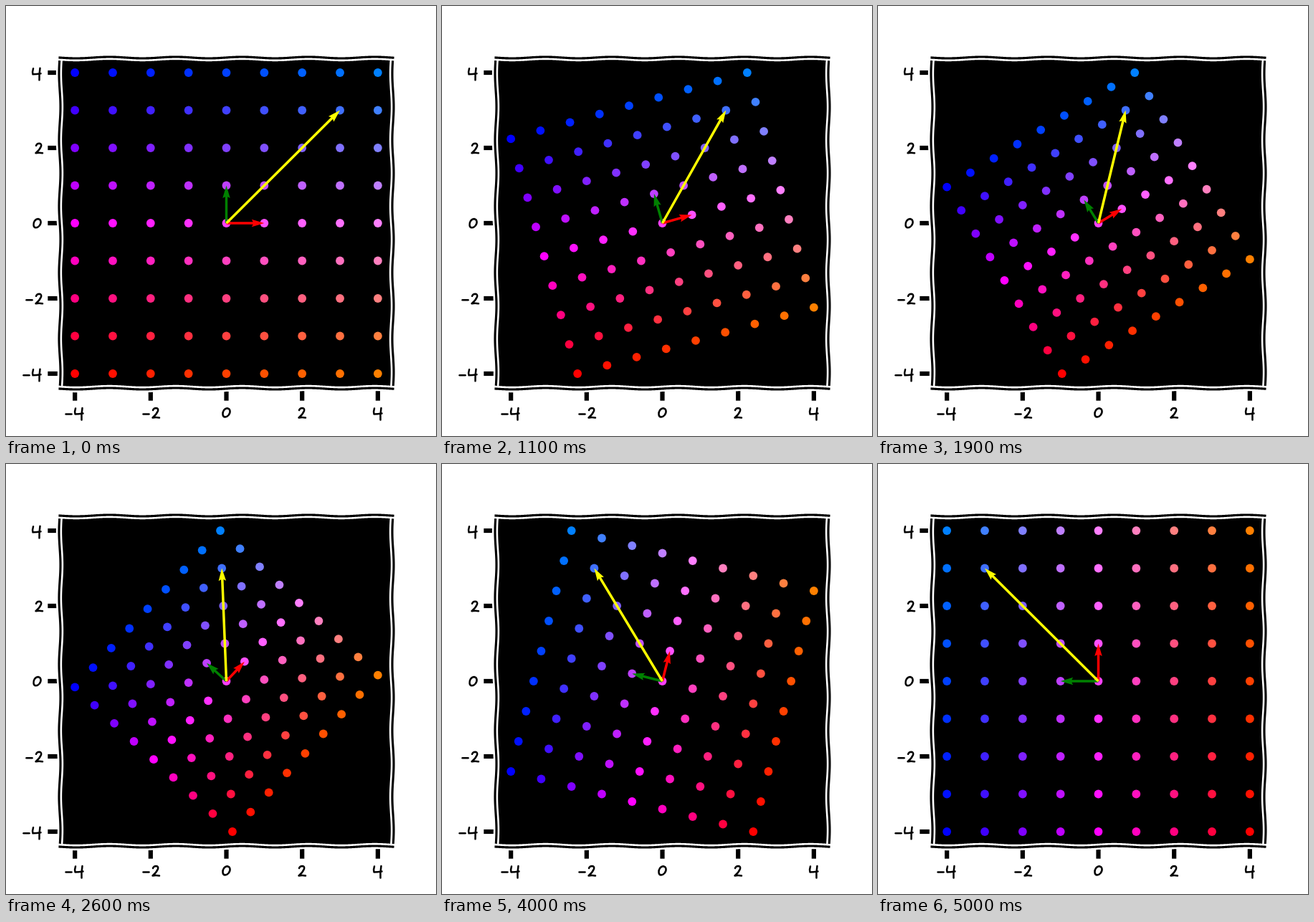
Recreate the animation shown at these times as an HTML page with a canvas. Size 600 by 600 pixels, loop 5100 ms.

```html
<!DOCTYPE html>
<html lang="en">
<head>
<meta charset="utf-8">
<title>Linear map of a grid</title>
<style>
html, body { margin: 0; width: 100%; height: 100%; overflow: hidden; background: #fff; }
canvas { display: block; width: 600px; height: 600px; }
</style>
</head>
<body>
<canvas id="stage" width="600" height="600" role="img"
  aria-label="Grid of points, both axes labelled -4, -2, 0, 2, 4"></canvas>
<script>
const ctx = document.getElementById('stage').getContext('2d');
const LEFT = 75, RIGHT = 540, TOP = 72, BOTTOM = 534;
const STEPS = 50, STEP_MS = 100;
const TAU = 2 * Math.PI;
const toX = x => 307.5 + x * 465 / 8.8;
const toY = y => 303 - y * 462 / 8.8;

// Hand-lettered numerals
const glyphs = {
  '0': new Path2D('M8 1.2C3.5 1.5 1 6 1.5 10C2 14.5 6.5 14.5 9.5 11C13 7 12 1 7 1.5'),
  '2': new Path2D('M2 4Q3 1 6.5 1Q10 1.5 9 5Q7 10 1.5 14.5Q6 13.5 11 14.5'),
  '4': new Path2D('M2 1.5Q.5 6 1.5 9.5Q6 9.5 12.5 8.5M11.5 1Q10 10 10.5 17.5'),
  '-': new Path2D('M-11.5 9.5H-3.5')
};

function drawLabel(text, x, y) {
  ctx.save();
  ctx.translate(x, y);
  ctx.lineWidth = 2.5;
  ctx.lineCap = ctx.lineJoin = 'round';
  for (const char of text) ctx.stroke(glyphs[char]);
  ctx.restore();
}

function drawAxisMarks() {
  ctx.fillStyle = ctx.strokeStyle = '#000';
  const columns = [95, 203, 301, 407, 512];
  const indents = [36, 40, 37, 40, 36];
  [-4, -2, 0, 2, 4].forEach((value, i) => {
    ctx.fillRect(toX(value) - 3.1, BOTTOM, 6.2, 16.7);
    ctx.fillRect(LEFT - 16.7, toY(value) - 3.1, 16.7, 6.2);
    drawLabel(String(value), columns[i], 560);
    drawLabel(String(value), indents[i], toY(value) - 7.2);
  });
}

// Wavy black line with a white halo
function drawSpine(x, y, length, vertical) {
  ctx.beginPath();
  for (let s = 0; s <= length; s++) {
    const wave = Math.sin(s / 92.5 * TAU);
    if (vertical) ctx.lineTo(x + wave, y - s);
    else ctx.lineTo(x + s, y + wave);
  }
  ctx.lineCap = 'square';
  ctx.lineJoin = 'round';
  for (const [color, width] of [['#fff', 8.33], ['#000', 3.13]]) {
    ctx.strokeStyle = color;
    ctx.lineWidth = width;
    ctx.stroke();
  }
}

function drawArrow([x, y], color) {
  const dx = toX(x) - toX(0), dy = toY(y) - toY(0);
  const length = Math.hypot(dx, dy), w = 3.49;
  const outline = [[0, w / 2], [length - 4.5 * w, w / 2], [length - 5 * w, 1.5 * w], [length, 0],
    [length - 5 * w, -1.5 * w], [length - 4.5 * w, -w / 2], [0, -w / 2]];
  ctx.save();
  ctx.translate(toX(0), toY(0));
  ctx.rotate(Math.atan2(dy, dx));
  ctx.beginPath();
  for (const point of outline) ctx.lineTo(...point);
  ctx.fillStyle = color;
  ctx.fill();
  ctx.restore();
}

function drawDots(map) {
  for (let x = -4; x <= 4; x++) {
    for (let y = -4; y <= 4; y++) {
      const [px, py] = map(x, y);
      const red = 255 * Math.min(1, 1 - y / 4);
      const blue = 255 * Math.min(1, 1 + y / 4);
      ctx.fillStyle = `rgb(${red}, ${(x + 4) * 16}, ${blue})`;
      ctx.beginPath();
      ctx.arc(toX(px), toY(py), 5.9, 0, TAU);
      ctx.fill();
    }
  }
}

function draw(time) {
  // Blend of the identity and a quarter turn
  const t = Math.floor(time / STEP_MS) % (STEPS + 1) / STEPS;
  const map = (x, y) => [x * (1 - t) - y * t, x * t + y * (1 - t)];

  ctx.fillStyle = '#fff';
  ctx.fillRect(0, 0, 600, 600);
  ctx.fillStyle = '#000';
  ctx.fillRect(LEFT, TOP, RIGHT - LEFT, BOTTOM - TOP);
  drawDots(map);
  drawArrow(map(1, 0), '#f00');
  drawArrow(map(0, 1), '#008000');
  drawArrow(map(3, 3), '#ff0');
  drawAxisMarks();
  drawSpine(LEFT, BOTTOM, BOTTOM - TOP, true);
  drawSpine(RIGHT, BOTTOM, BOTTOM - TOP, true);
  drawSpine(LEFT, BOTTOM, RIGHT - LEFT, false);
  drawSpine(LEFT, TOP, RIGHT - LEFT, false);
}

const start = performance.now();
function tick() {
  draw(performance.now() - start);
  requestAnimationFrame(tick);
}
tick();
</script>
</body>
</html>
```
